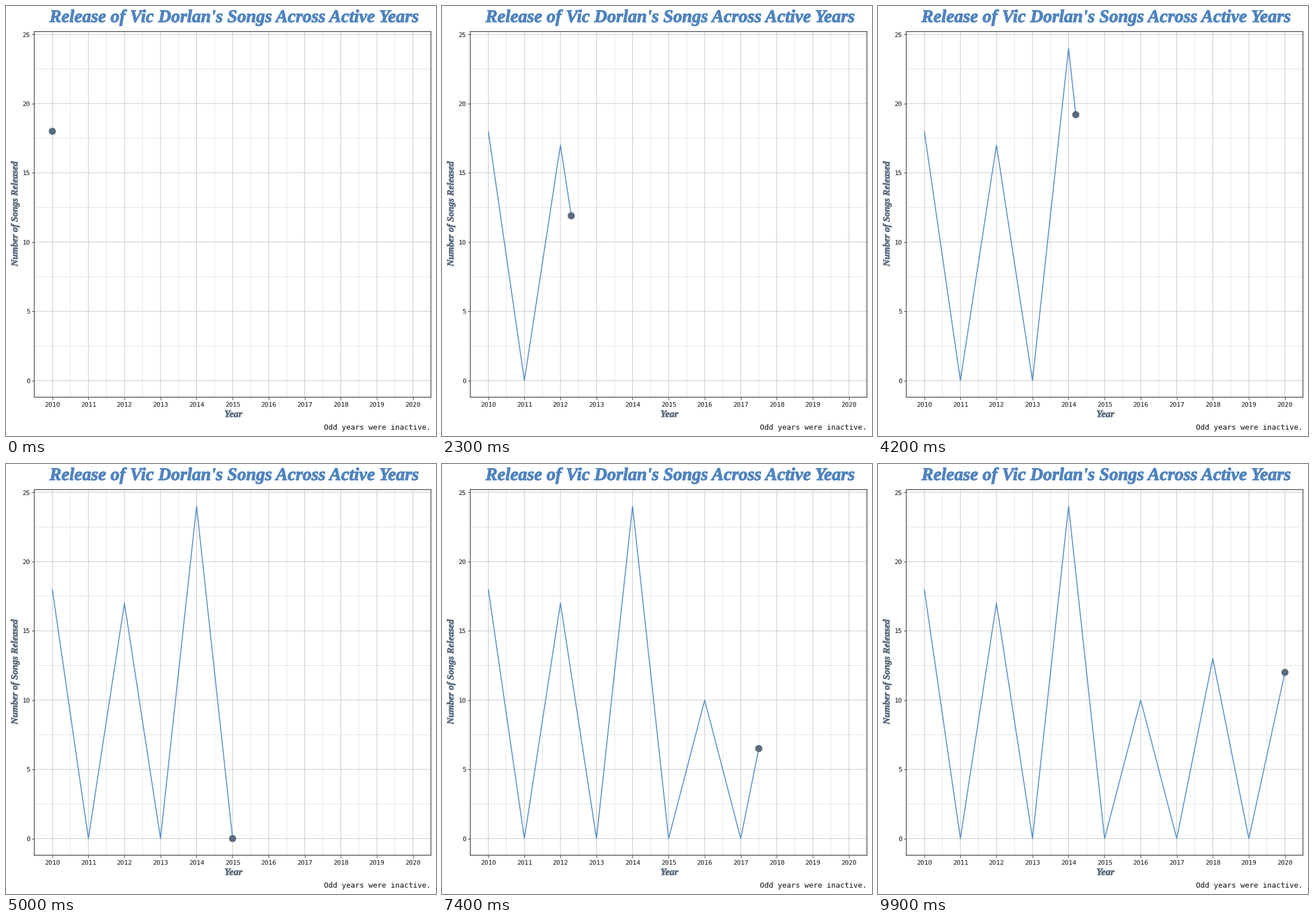
Write a matplotlib script that moves like this. It is 748 px wide and 748 px high and loops after 10000 ms.

```python
import numpy as np
import matplotlib.pyplot as plt
from matplotlib.animation import FuncAnimation
from matplotlib.patches import Ellipse
from matplotlib.patheffects import withStroke

SIZE, DPI = 748, 100
FRAMES, INTERVAL = 100, 100
PT = 72 / DPI  # points per pixel

BLUE, SLATE, INK, FRAME = "#5890c8", "#5b6c7f", "#111111", "#333333"
TITLE_BLUE = "#5084c0"
LEFT, RIGHT, TOP, BOTTOM = 49.2, 739.2, 44.5, 680.5
PX_YEAR = (RIGHT - LEFT) / 11
PX_SONG = (BOTTOM - TOP) / 26.4
DOT = 12.4

years = np.arange(2010, 2021)
songs = np.array([18, 0, 17, 0, 24, 0, 10, 0, 13, 0, 12])
counts = range(0, 26, 5)
# Each year is reached on a whole frame; motion is linear in between.
key_frames = np.round((years - years[0]) * (FRAMES - 1) / 10)

fig = plt.figure(figsize=(SIZE / DPI, SIZE / DPI), dpi=DPI, facecolor="white")
ax = fig.add_axes([LEFT / SIZE, 1 - BOTTOM / SIZE,
                   (RIGHT - LEFT) / SIZE, (BOTTOM - TOP) / SIZE])
ax.set(xlim=(2009.5, 2020.5), ylim=(-1.2, 25.2))


def year_px(year):
    return LEFT + (year - 2009.5) * PX_YEAR


def count_px(count):
    return BOTTOM - (count + 1.2) * PX_SONG


def write(x, y, text, size, color=INK, ha="center",
          family="DejaVu Sans Mono", **style):
    """Place text by its baseline, in pixels from the top left."""
    return fig.text(x / SIZE, 1 - y / SIZE, text, fontsize=size * PT,
                    color=color, ha=ha, va="baseline", family=family,
                    rotation_mode="anchor", **style)


def write_display(x, y, text, size, color, stroke, **style):
    label = write(x, y, text, size, color, family="Liberation Serif",
                  weight="bold", style="italic", **style)
    label.set_path_effects([withStroke(linewidth=stroke * PT,
                                       foreground=color)])


def grid(xs, ys, color, zorder):
    style = dict(color=color, linewidth=PT, snap=False, zorder=zorder)
    for x in xs:
        ax.axvline(x, **style)
    for y in ys:
        ax.axhline(y, **style)


# Grid, border and ticks
grid(years[:-1] + 0.5, np.arange(2.5, 25, 5), "#e3e3e3", 0.5)
grid(years, counts, "#c6c6c6", 0.6)
ax.set_xticks(years)
ax.set_yticks(counts)
ax.tick_params(length=4 * PT, width=PT, color=FRAME,
               labelbottom=False, labelleft=False)
for spine in ax.spines.values():
    spine.set(color=FRAME, linewidth=1.2 * PT, snap=False)

# Text
for year in years:
    write(year_px(year), 697, str(year), 11.3)
for count in counts:
    write(42, count_px(count) + 4.2, str(count), 11.3, ha="right")

write_display(397.5, 28, "Release of Vic Dorlan's Songs Across Active Years",
              31.1, TITLE_BLUE, 1.1)
write_display(395.5, 715, "Year", 17, SLATE, 0.7)
write_display(20, 361.5, "Number of Songs Released", 16.4, SLATE, 0.7,
              rotation=90)
write(739, 737, "Odd years were inactive.", 12.94, ha="right")

# Moving parts
line, = ax.plot([], [], color=BLUE, linewidth=1.7 * PT,
                solid_capstyle="butt", solid_joinstyle="round", zorder=2.2)
dot = ax.add_patch(Ellipse((years[0], songs[0]), DOT / PX_YEAR, DOT / PX_SONG,
                           facecolor=SLATE, linewidth=0, zorder=3))


def update(frame):
    now = np.interp(frame, key_frames, years)
    level = np.interp(now, years, songs)
    past = years < now
    line.set_data(np.append(years[past], now), np.append(songs[past], level))
    dot.set_center((now, level))
    return line, dot


anim = FuncAnimation(fig, update, frames=FRAMES, interval=INTERVAL,
                     init_func=lambda: update(0), repeat=True, repeat_delay=0)
plt.show()
```
